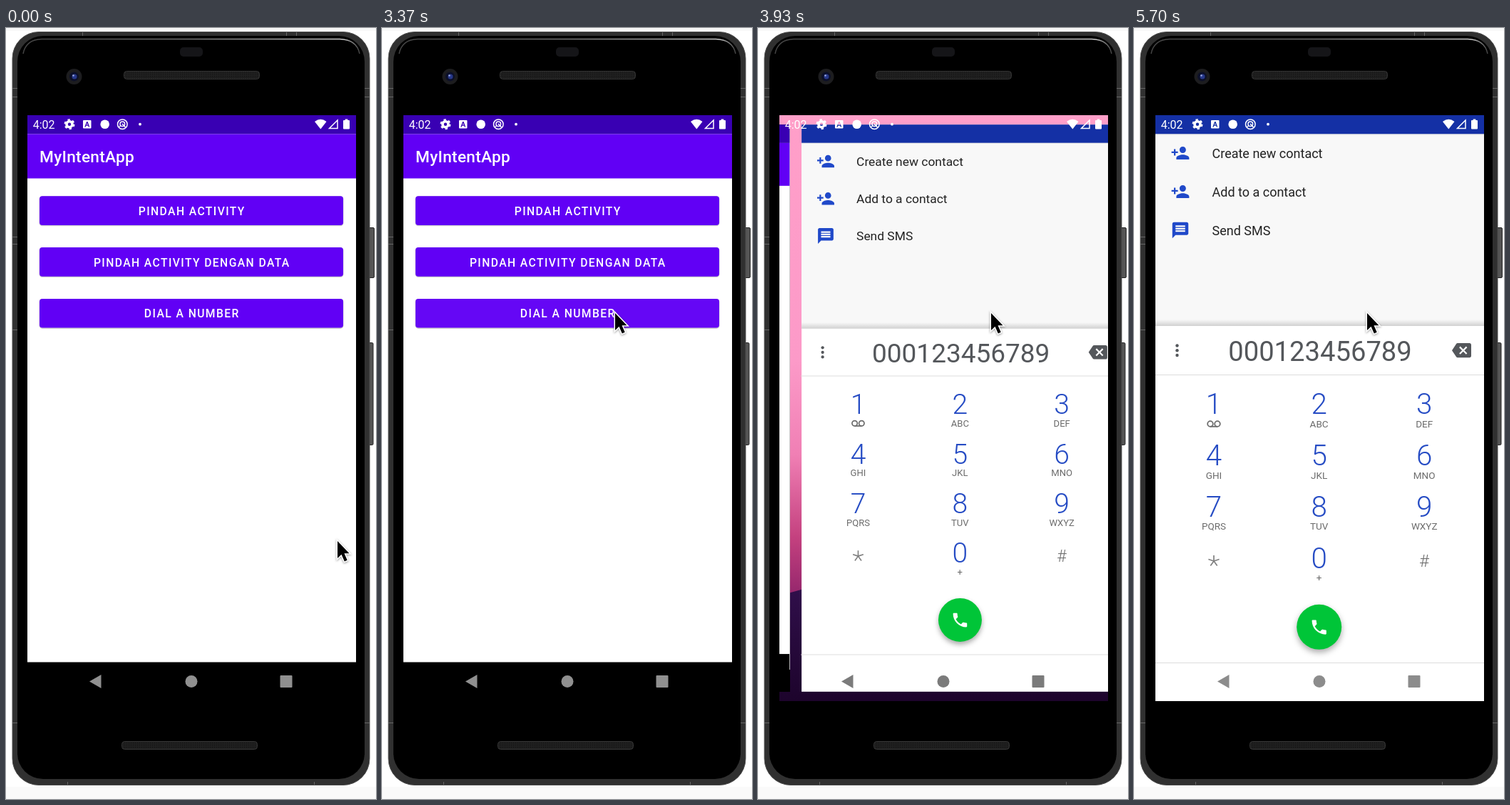
Write an HTML page that moves like this. It is 519 by 1079 pixels and loops after 5.81 s.

```html
<!DOCTYPE html>
<html lang="id">
<head>
<meta charset="utf-8">
<title>MyIntentApp</title>
<style>
  html, body { margin: 0; width: 100%; height: 100%; overflow: hidden; background: #fff; }
  svg { display: block; width: 100%; height: 100%; font-family: Roboto, sans-serif; }
  .panel { transform-origin: 260.5px 532px; }
  .button { font-size: 15.7px; font-weight: 500; letter-spacing: 1.4px; text-anchor: middle; fill: #fff; }
  .row { font-size: 18px; fill: #222; }
  .digit { font-size: 40.4px; font-weight: 300; fill: #264cc4; text-anchor: middle; }
  .letters { font-size: 13.5px; fill: #6c6c6c; text-anchor: middle; }
  .blue { fill: #2049c9; }
</style>
</head>
<body>
<svg viewBox="0 0 519 1079">
  <defs>
    <clipPath id="screen"><rect x="30" y="122" width="461" height="820"/></clipPath>
    <linearGradient id="sheen">
      <stop offset="0" stop-color="#444"/><stop offset=".5" stop-color="#777"/>
      <stop offset=".95" stop-color="#ccc"/><stop offset="1" stop-color="#444"/>
    </linearGradient>
    <linearGradient id="sky" x2="0" y2="1">
      <stop offset="0" stop-color="#ff9fc9"/><stop offset=".42" stop-color="#fc9ac8"/>
      <stop offset=".58" stop-color="#f07fb4"/><stop offset=".72" stop-color="#c4417f"/>
      <stop offset=".82" stop-color="#94266c"/>
    </linearGradient>
    <linearGradient id="hill" x2="0" y2="1">
      <stop offset="0" stop-color="#33104f"/><stop offset="1" stop-color="#1d042c"/>
    </linearGradient>
    <linearGradient id="edge" x2="0" y2="1">
      <stop offset="0" stop-opacity="0"/><stop offset="1" stop-opacity=".16"/>
    </linearGradient>
    <pattern id="mesh" width="3" height="3" patternUnits="userSpaceOnUse">
      <rect width="3" height="3" fill="#202020"/><circle cx="1.5" cy="1.5" r=".8" fill="#111"/>
    </pattern>
    <clipPath id="third"><rect x="47" y="379" width="426" height="40.5" rx="4"/></clipPath>
    <path id="person" d="M15 12c2.21 0 4-1.79 4-4s-1.79-4-4-4-4 1.79-4 4 1.79 4 4 4zm-9-2V7H4v3H1v2h3v3h2v-3h3v-2H6zm9 4c-2.67 0-8 1.34-8 4v2h16v-2c0-2.66-5.33-4-8-4z"/>
  </defs>

  <!-- phone body -->
  <rect width="519" height="4" fill="#f8f8f8"/>
  <rect y="1062" width="519" height="17" fill="#fafafa"/>
  <g fill="#555" stroke="#222">
    <rect x="508.5" y="279.5" width="8" height="70" rx="1.5"/>
    <rect x="508.5" y="440.5" width="6.5" height="143" rx="1.5"/>
  </g>
  <rect x="9" y="5.5" width="501" height="1054" rx="37" fill="#303030" stroke="#4c4c4c"/>
  <path d="M9 84.5h8M9 96.5h8M502 84.5h8M502 96.5h8M9 292.5h7M9 302.5h7M9 422.5h7M9 972.5h8M502 972.5h8M107.5 6v5M393.5 6v5M407.5 6v5M86.5 1055v4M432.5 1055v4" stroke="#666"/>
  <rect x="16" y="11" width="487" height="1040" rx="36"/>
  <path d="M24 36Q28 16 50 15.500H468Q492 16 496 36" fill="none" stroke="url(#sheen)" stroke-width="1.5"/>
  <rect x="244" y="27" width="32" height="13" rx="5" fill="#151518"/>
  <g fill="url(#mesh)" stroke="#363636">
    <rect x="165.5" y="60.5" width="190" height="11" rx="4"/>
    <rect x="162.5" y="998.5" width="190" height="11" rx="4"/>
  </g>
  <circle cx="95.5" cy="68" r="11" fill="#1d1d1f"/>
  <circle cx="95.5" cy="68" r="6.5" fill="#0c1029"/>
  <circle cx="96" cy="68" r="3.5" fill="#27388a"/>
  <circle cx="94.5" cy="66.5" r="1.3" fill="#9aa8e0"/>

  <g clip-path="url(#screen)">
    <rect x="30" y="122" width="461" height="820" fill="url(#sky)"/>
    <path d="M29 795Q95 775 150 768T290 790T492 760V942H29Z" fill="url(#hill)"/>

    <g id="app"><g class="panel">
      <rect x="30" y="122" width="461" height="820"/>
      <rect x="30" y="148" width="461" height="739.5" fill="#fff"/>
      <rect x="30" y="122" width="461" height="26.5" fill="#3900b3"/>
      <rect x="30" y="148.5" width="461" height="62" fill="#6100f5"/>
      <text x="47" y="188" font-size="22.7" font-weight="500" letter-spacing=".28" fill="#fff">MyIntentApp</text>
      <g id="buttons"></g>
      <g clip-path="url(#third)"><circle id="ripple" cx="326" cy="398" r="300" fill="#fff" opacity="0"/></g>
    </g></g>

    <g id="dialer"><g class="panel">
      <rect x="30" y="122" width="461" height="820" fill="#fff"/>
      <rect x="30" y="148" width="461" height="269" fill="#f8f8f8"/>
      <rect x="30" y="122" width="461" height="26.5" fill="#1430a5"/>
      <rect x="30" y="148.5" width="461" height="1" fill="#e4e4e4"/>
      <rect x="30" y="408" width="461" height="9" fill="url(#edge)"/>
      <g class="blue">
        <use href="#person" transform="translate(51.5 161.5) scale(1.125)"/>
        <use href="#person" transform="translate(51.5 215.5) scale(1.125)"/>
        <path transform="translate(51.5 269.5) scale(1.125)" fill-rule="evenodd" d="M20 2H4c-1.1 0-2 .9-2 2v18l4-4h14c1.1 0 2-.9 2-2V4c0-1.1-.9-2-2-2zM6 6h12v2H6zm0 3h12v2H6zm0 3h12v2H6z"/>
      </g>
      <g class="row">
        <text x="109.5" y="181.7">Create new contact</text>
        <text x="109.5" y="235.7">Add to a contact</text>
        <text x="109.5" y="289.5">Send SMS</text>
      </g>
      <g fill="#54575b">
        <circle cx="60.5" cy="444.5" r="2.2"/><circle cx="60.5" cy="451.3" r="2.2"/><circle cx="60.5" cy="458" r="2.2"/>
        <text x="261" y="465.7" font-size="38.2" text-anchor="middle">000123456789</text>
        <path transform="translate(446 437.7) scale(1.125)" d="M22 3H7c-.7 0-1.2.35-1.6.9L0 12l5.4 8.1c.4.5.9.9 1.6.9h15c1.1 0 2-.9 2-2V5c0-1.1-.9-2-2-2zm-3 12.6L17.6 17 14 13.4 10.4 17 9 15.6 12.6 12 9 8.4 10.4 7 14 10.6 17.6 7 19 8.4 15.4 12z"/>
      </g>
      <path d="M29 485.5H492M29 888.5H492" stroke="#dcdcdc"/>
      <g id="keys"></g>
      <g fill="none" stroke="#6c6c6c" stroke-width="1.8">
        <circle cx="107" cy="554" r="3.8"/><circle cx="117" cy="554" r="3.8"/><path d="M107 557.8h10"/>
      </g>
      <path d="M112 746V738M112 746l7.6-2.5M112 746l4.7 6.5M112 746l-4.7 6.5M112 746l-7.6-2.5" stroke="#808080" stroke-width="1.7"/>
      <text x="407" y="754" font-size="24" font-weight="300" text-anchor="middle" fill="#707070">#</text>
      <circle cx="259.7" cy="838.3" r="31.5" fill="#00c538" style="filter:drop-shadow(0 4px 4px #0005)"/>
      <path transform="translate(246.2 825) scale(1.125)" fill="#fff" d="M6.62 10.79c1.44 2.83 3.76 5.14 6.59 6.59l2.2-2.2c.27-.27.67-.36 1.02-.24 1.12.37 2.33.57 3.57.57.55 0 1 .45 1 1V20c0 .55-.45 1-1 1-9.39 0-17-7.61-17-17 0-.55.45-1 1-1h3.5c.55 0 1 .45 1 1 0 1.25.2 2.45.57 3.57.11.35.03.74-.25 1.02z"/>
    </g></g>

    <!-- system bars -->
    <g fill="#fff">
      <text x="37.7" y="141" font-size="16">4:02</text>
      <g fill="none" stroke="#fff">
        <circle cx="89" cy="134.7" r="4" stroke-width="3.6"/>
        <circle cx="89" cy="134.7" r="6.3" stroke-width="2.4" stroke-dasharray="3.3 3.3"/>
        <circle cx="163.3" cy="134.7" r="6.8" stroke-width="1.5"/>
        <circle cx="163.3" cy="134.3" r="3.3" stroke-width="1.5"/>
        <path d="M163 134l5 5.5M158.5 138.5l2-1.5" stroke-width="1.5"/>
        <path d="M453.5 140.5H465V129Z" stroke-width="1.5"/>
      </g>
      <path fill-rule="evenodd" d="M109 129h9.5q1 0 1 1v9.5q0 1-1 1H109q-1 0-1-1V130q0-1 1-1zM113.1 131l-2.8 7.5h1.5l.6-1.8h2.8l.6 1.8h1.5L114.5 131zM113.8 133l.9 2.6h-1.8z"/>
      <circle cx="138.7" cy="134.7" r="6.3"/>
      <circle cx="188" cy="134.7" r="1.9"/>
      <path d="M433 131Q441.3 124.5 449.5 131L441.3 141.5Z"/>
      <path d="M475.7 127.5h3.6v1.5h1.7q1 0 1 1v10.5q0 1-1 1h-7q-1 0-1-1V130q0-1 1-1h1.7z"/>
    </g>
    <g id="nav" fill="#909090">
      <path d="M117 914.5L133.5 905V924Z"/>
      <circle cx="260" cy="914.5" r="8.5"/>
      <rect x="384.5" y="906" width="17" height="17" rx="1"/>
    </g>
  </g>

  <g id="cursor" style="filter:drop-shadow(0 1.5px 1.5px #0006)">
    <path d="M1 2V26L6.5 20.8L10.8 30.5L14.7 28.8L10.5 19.2H17.5Z" stroke="#fff" stroke-width="3" paint-order="stroke"/>
  </g>
</svg>
<script>
  const LOOP = 5810;
  const byId = id => document.getElementById(id);

  byId('buttons').innerHTML = ['PINDAH ACTIVITY', 'PINDAH ACTIVITY DENGAN DATA', 'DIAL A NUMBER']
    .map((label, i) => {
      const y = 235.3 + i * 71.8;
      return `<rect x="46.5" y="${y}" width="427" height="42" rx="4.5" opacity=".18"/>
        <rect x="47" y="${y}" width="426" height="40.7" rx="4" fill="#6100f5"/>
        <text class="button" x="260.8" y="${y + 26.5}">${label}</text>`;
    }).join('');

  const keys = ['1', '2 ABC', '3 DEF', '4 GHI', '5 JKL', '6 MNO', '7 PQRS', '8 TUV', '9 WXYZ', '', '0 +'];
  byId('keys').innerHTML = keys.map((key, i) => {
    const [digit, letters = ''] = key.split(' ');
    const x = 112 + (i % 3) * 147.6, y = 540.3 + Math.floor(i / 3) * 71.8;
    return `<text class="digit" x="${x}" y="${y}">${digit}</text>
      <text class="letters" x="${x}" y="${y + 18.5}">${letters}</text>`;
  }).join('');

  const start = document.timeline.currentTime || 0;

  // Each step: [time in ms, value, easing towards the next step]
  function play(element, property, steps) {
    const first = steps[0], last = steps[steps.length - 1];
    const frames = [[0, first[1]], ...steps, [LOOP, last[1]]].map(([time, value, easing = 'linear']) =>
      ({ offset: time / LOOP, [property]: value, easing }));
    element.animate(frames, { duration: LOOP, iterations: Infinity }).startTime = start;
  }

  const at = (x, y) => `translate(${x}px, ${y}px)`;
  const slide = 'cubic-bezier(.2, 0, 0, 1)';

  play(byId('cursor'), 'transform', [
    [690, at(464, 716), 'cubic-bezier(.4, 0, .6, .57)'],
    [1230, at(335, 410), 'cubic-bezier(.1, .5, .3, 1)'],
    [1330, at(326, 397)]
  ]);
  play(byId('ripple'), 'opacity', [[3300, 0], [3370, .03], [3470, .08], [3600, .04], [3660, 0]]);
  play(byId('app'), 'transform', [[3657, at(0, 0), slide], [4077, at(-463, 0)]]);
  play(byId('dialer'), 'transform', [[3657, at(463, 0), slide], [4077, at(0, 0)]]);
  document.querySelectorAll('.panel').forEach(panel => play(panel, 'transform', [
    [3635, 'scale(1)', 'ease-in-out'],
    [3770, 'scale(.9555)'],
    [3830, 'scale(.9555)', 'cubic-bezier(.4, 0, .5, .8)'],
    [4070, 'scale(.99)', 'ease-out'],
    [4190, 'scale(1)']
  ]));
  play(byId('nav'), 'fill', [
    [3640, '#909090'], [3740, 'rgba(255, 255, 255, .8)'], [3830, 'rgba(255, 255, 255, .8)'],
    [3960, '#555'], [4080, '#555'], [4190, '#8c8c8c']
  ]);
</script>
</body>
</html>
```
